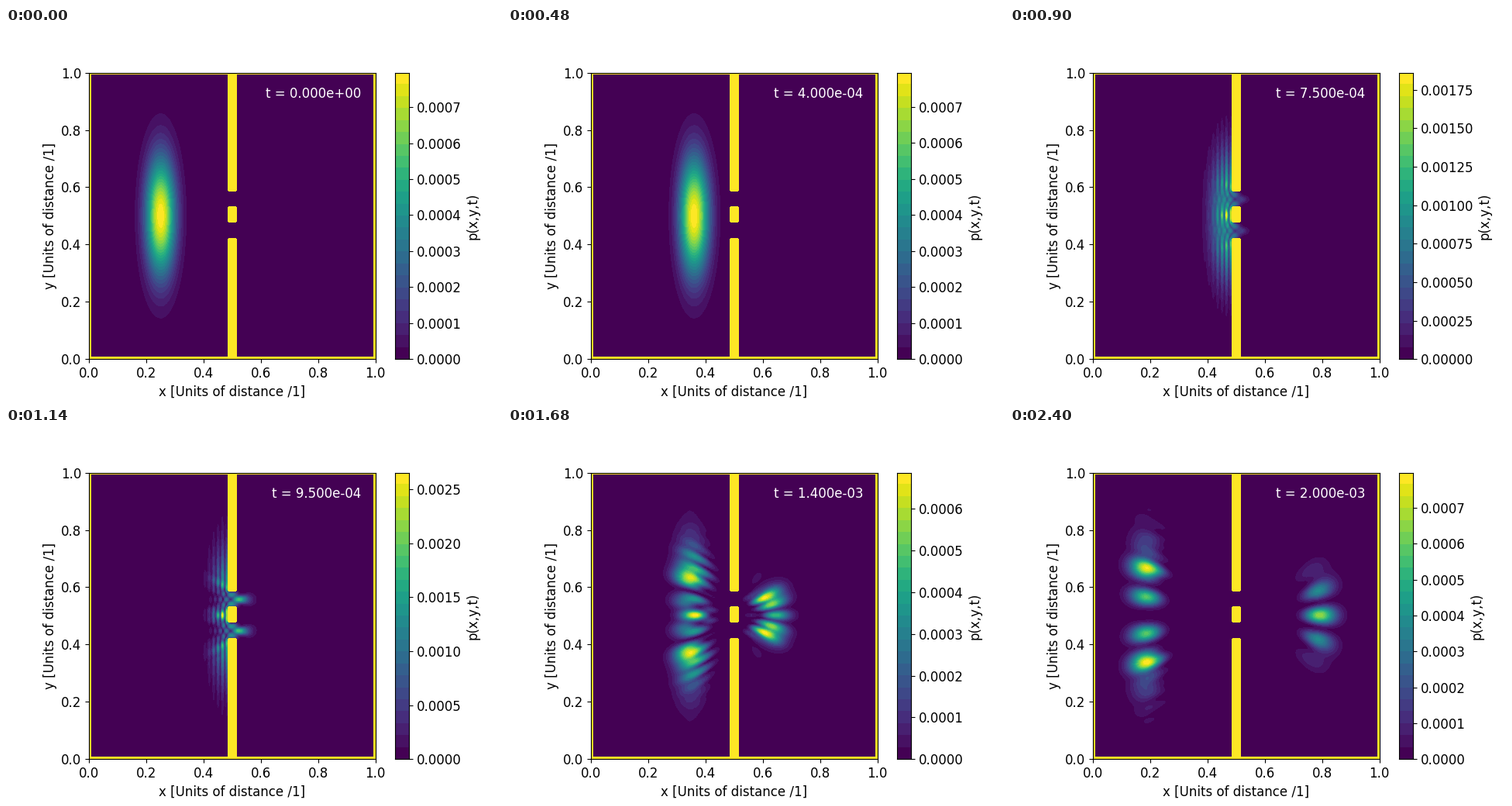
Write a matplotlib script that moves like this. It is 640 px wide and 480 px high and loops after 2460 ms.

```python
import numpy as np
import matplotlib.pyplot as plt
from matplotlib.animation import FuncAnimation
from matplotlib.patches import Polygon, Rectangle

W, H = 640, 480
FRAMES, INTERVAL = 41, 60
N = 200                  # grid cells per side
STEP = 1 / N
DT = 2.5e-5
BANDS = 24
COLORS = plt.get_cmap("viridis")(np.linspace(0, 1, BANDS))
YELLOW = COLORS[-1]


def simulate():
    """Crank-Nicolson wave packet meeting a hard double slit, in a sine basis."""
    idx = np.arange(1, N)
    sine = np.sqrt(2 / N) * np.sin(np.pi * np.outer(idx, idx) / N)
    lam = 4 / STEP**2 * np.sin(np.pi * idx / (2 * N))**2
    energy = lam[:, None] + lam[None, :]
    denom = 1 + 0.5j * DT * energy
    turn = (1 - 0.5j * DT * energy) / denom

    cols = (idx >= 98) & (idx <= 102)
    slit = ((idx >= 84) & (idx <= 95)) | ((idx >= 106) & (idx <= 117))
    sx, sy = sine[cols], sine[~slit]

    # Response of the wall nodes to sources placed on them
    g = np.einsum("ak,bk,kl->abl", sx, sx, 1 / denom, optimize=True)
    cap = np.einsum("jl,abl,ml->ajbm", sy, g, sy, optimize=True)
    size = len(sx) * len(sy)
    cap_inv = np.linalg.inv(cap.reshape(size, size))

    x, y = idx[:, None] * STEP, idx[None, :] * STEP
    u = np.exp(-(x - 0.25)**2 / (2 * 0.05**2)
               - (y - 0.5)**2 / (2 * 0.2**2) + 200j * x)
    u[np.outer(cols, ~slit)] = 0
    u /= np.sqrt(np.sum(np.abs(u)**2))

    v = sine @ u @ sine
    result = []
    for n in range(2 * FRAMES - 1):
        if n % 2 == 0:
            p = np.abs(sine @ v @ sine)**2
            result.append(np.pad(p, 1).T)
        v = turn * v
        at_wall = sx @ v @ sy.T
        force = (cap_inv @ at_wall.ravel()).reshape(at_wall.shape)
        v = v - (sx.T @ force @ sy) / denom
    return result


def pixel_axes(x, y, w, h):
    return fig.add_axes([x / W, y / H, w / W, h / H])


def add_wall(bottom, top, left=0.4845, right=0.5155, cut=0.0045):
    ax.add_patch(Polygon(
        [(left + cut, bottom), (right - cut, bottom),
         (right, bottom + cut), (right, top - cut),
         (right - cut, top), (left + cut, top),
         (left, top - cut), (left, bottom + cut)],
        fc=YELLOW, ec="none", aa=False, zorder=2))


def add_edge(x, y, w, h):
    ax.add_patch(Rectangle((x, y), w, h, fc=YELLOW, ec="none",
                           aa=False, zorder=2))


density = simulate()
grid = np.linspace(0, 1, N + 1)

fig = plt.figure(figsize=(W / 100, H / 100), dpi=100)

ax = pixel_axes(107.2, 52.8, 369.6, 369.6)
ax.set_facecolor(COLORS[0])
ax.set_xlabel("x [Units of distance /1]", fontsize=12)
ax.set_ylabel("y [Units of distance /1]", fontsize=12)
ax.tick_params(labelsize=12)

add_wall(-0.1, 0.4225)
add_wall(0.477, 0.531)
add_wall(0.585, 1.1)
rim = 0.0075
add_edge(0, 0, rim, 1)
add_edge(1 - rim, 0, rim, 1)
add_edge(0, 0, 1, rim)
add_edge(0, 1 - rim, 1, rim)
clock = ax.text(0.95, 0.95, "", color="white", fontsize=12,
                ha="right", va="top", zorder=3)

cax = pixel_axes(501.6, 52.8, 18.48, 369.6)
bar = cax.imshow(np.arange(BANDS)[:, None], cmap="viridis", origin="lower",
                 aspect="auto", interpolation="nearest", extent=(0, 1, 0, 1))
cax.set_xticks([])
cax.yaxis.tick_right()
cax.yaxis.set_label_position("right")
cax.tick_params(labelsize=12)
cax.set_ylabel("p(x,y,t)", fontsize=12)

contours = []


def update(n):
    while contours:
        contours.pop().remove()
    p = density[n]
    top = p.max()
    contours.append(ax.contourf(grid, grid, p, colors=COLORS,
                                levels=np.linspace(0, top, BANDS + 1)))
    ax.set_xlim(0, 1)
    ax.set_ylim(0, 1)
    bar.set_extent((0, 1, 0, top))
    cax.set_ylim(0, top)
    clock.set_text(f"t = {2 * n * DT:.3e}")
    return []


anim = FuncAnimation(fig, update, frames=FRAMES, interval=INTERVAL,
                     init_func=lambda: [], repeat=True, repeat_delay=0)
plt.show()
```
